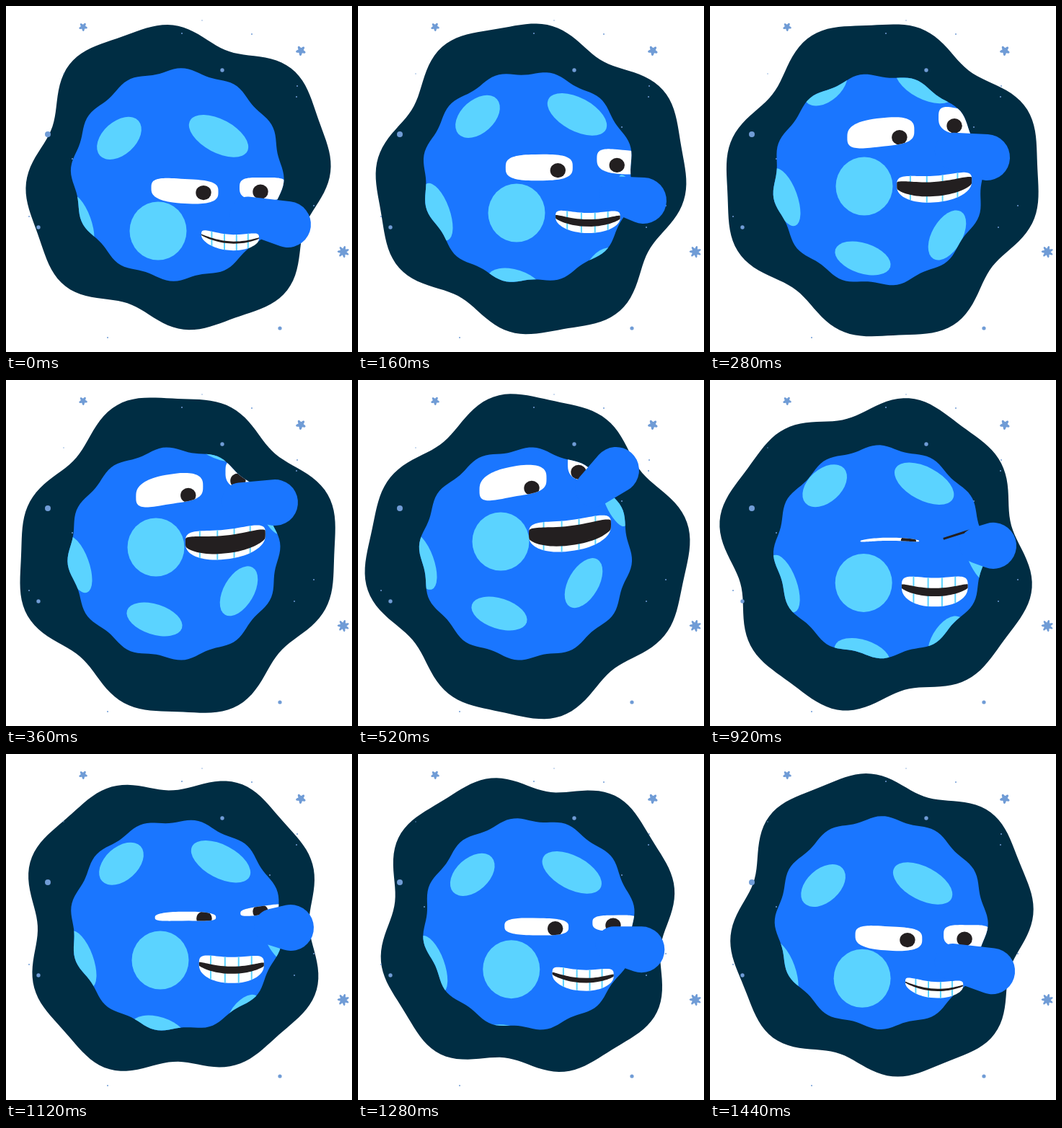
An HTML page with a canvas that plays this animation: 480x480 px, repeating every 1480 ms.

```html
<!DOCTYPE html>
<html lang="en">
<head>
<meta charset="utf-8">
<title>Laughing planet</title>
<style>
html, body { margin: 0; width: 100%; height: 100%; overflow: hidden; background: #fff; }
canvas { display: block; width: 100vw; height: 100vh; }
</style>
</head>
<body>
<canvas id="stage" width="480" height="480"></canvas>
<script>
const ctx = document.getElementById('stage').getContext('2d');
const LOOP = 1480, STEP = 40, TAU = Math.PI * 2, RAD = Math.PI / 180;
const SPACE = '#002d43', BODY = '#1a76ff', SPOT = '#5bd3ff', INK = '#231f20', STAR = '#709cd6';

// Time, cheek x and y, eye openness, nose root x and y, nose tip x and y.
const POSES = [
  [0, 211, 312, 1, 336, 290, 391, 303],
  [160, 220, 287, 1, 360, 262, 396, 270],
  [360, 208, 232, 1, 325, 168, 373, 170],
  [520, 198, 224, 1, 327, 151, 358, 125],
  [720, 211, 276, 0, 373, 217, 388, 217],
  [1120, 214, 286, .35, 370, 240, 395, 241]
];

// Offset from the cheek, how strongly the spot follows it vertically, radii, tilt.
const SPOTS = [
  { dx: 0, dy: 0, follow: 1, rx: 39.5, ry: 40.5, tilt: 0 },
  { dx: -54, dy: -140, follow: 1.2, rx: 36, ry: 23, tilt: -42 },
  { dx: 84, dy: -143, follow: 1.2, rx: 45, ry: 23, tilt: 28 },
  { dx: -110, dy: 13, follow: .55, rx: 42, ry: 17, tilt: 70 },
  { dx: -2, dy: 100, follow: 1, rx: 40, ry: 21, tilt: 18 },
  { dx: 115, dy: 70, follow: 1.4, rx: 38, ry: 21, tilt: -60 },
  { dx: 158, dy: -37, follow: 1.35, rx: 30, ry: 10, tilt: 62 }
];

const DOTS = [
  [58, 178, 4], [45, 307, 2.7], [300, 89, 2.7], [380, 447, 2.6], [244, 38, 1], [272, 20, .7],
  [341, 39, 1], [80, 94, .7], [404, 111, 1], [403, 126, 1], [366, 168, 1], [92, 212, 1],
  [32, 292, 1], [427, 277, 1], [400, 307, 1], [141, 460, 1]
];

// Pose values with the loop unrolled, so neighbours exist on both sides.
function key(i, j) {
  const n = POSES.length, lap = Math.floor(i / n);
  return POSES[i - lap * n][j] + (j ? 0 : lap * LOOP);
}

// Smooth interpolation without overshoot.
function poseAt(t) {
  let k = POSES.length - 1;
  while (key(k, 0) > t) k--;
  const slope = (i, j) => (key(i + 1, j) - key(i, j)) / (key(i + 1, 0) - key(i, 0));
  const tangent = (i, j) => {
    const a = slope(i - 1, j), b = slope(i, j);
    return a * b <= 0 ? 0 : 2 * a * b / (a + b);
  };
  const span = key(k + 1, 0) - key(k, 0), u = (t - key(k, 0)) / span, s = u * u * (3 - 2 * u);
  const [, x, y, open, rootX, rootY, tipX, tipY] = POSES[k].map((a, j) =>
    a + (key(k + 1, j) - a) * s
    + span * u * (1 - u) * ((1 - u) * tangent(k, j) - u * tangent(k + 1, j)));
  const lift = (312 - y) / 88;
  return { x, y, open, lift, rootX, rootY, tipX, tipY };
}

function fill(path, color) {
  ctx.fillStyle = color;
  ctx.fill(path);
}

function ellipse(x, y, rx, ry, tilt, color) {
  const path = new Path2D();
  path.ellipse(x, y, rx, ry, tilt * RAD, 0, TAU);
  fill(path, color);
}

function clipped(path, draw) {
  ctx.save();
  ctx.clip(path);
  draw();
  ctx.restore();
}

function radialPath(cx, cy, radius) {
  const path = new Path2D();
  for (let a = 0; a < TAU; a += TAU / 180) {
    path.lineTo(cx + radius(a) * Math.cos(a), cy + radius(a) * Math.sin(a));
  }
  path.closePath();
  return path;
}

// Rounded box that can slope and bow upwards by arch.
function lozenge({ cx, cy, w, h, slope, arch }) {
  const path = new Path2D(), soft = v => Math.sign(v) * Math.abs(v) ** .65;
  for (let a = 0; a < TAU; a += TAU / 90) {
    const x = soft(Math.cos(a)), y = soft(Math.sin(a));
    path.lineTo(cx + x * w / 2, cy + y * h / 2 + slope * x * w / 2 - arch * (1 - x * x));
  }
  path.closePath();
  return path;
}

function drawSpace(t, turn) {
  const wave = delay => Math.cos(TAU * (t - delay) / LOOP);
  fill(radialPath(235 + 5 * wave(150), 241 + 4 * wave(600), a => {
    const p = a - turn - 18 * RAD;
    return 210 + 5 * wave(560) - 11.5 * Math.cos(4 * p) - 7 * Math.cos(8 * p - .58);
  }), SPACE);
}

function drawStar(x, y, r, points, turn) {
  fill(radialPath(x, y, a => r * (.78 + .22 * Math.cos(points * (a - turn)))), STAR);
}

function drawStars() {
  DOTS.forEach(([x, y, r]) => ellipse(x, y, r, r, 0, STAR));
  drawStar(107, 29, 6, 5, -1);
  drawStar(409, 62, 7, 5, -2.1);
  drawStar(468, 341, 8.3, 7, -.4);
}

function drawEye(eye, pupilX, pupilY) {
  const { cx, cy, w, h, slope, arch } = eye;
  if (h < 4) {
    const rise = slope * w / 2;
    ctx.beginPath();
    ctx.moveTo(cx - w / 2, cy - rise);
    ctx.quadraticCurveTo(cx, cy - 2 * arch, cx + w / 2, cy + rise);
    ctx.strokeStyle = INK;
    ctx.lineWidth = 3;
    ctx.stroke();
    return;
  }
  const path = lozenge(eye);
  fill(path, '#fff');
  clipped(path, () => ellipse(cx + pupilX, cy + pupilY * h, 10.7, 10.2, 0, INK));
}

function drawEyes({ x, y, lift, open }) {
  const shut = 1 - open, raised = lift * open;
  drawEye({
    cx: x + 37 - 20 * raised, cy: y - 57 - 22 * raised,
    w: 93 - 13 * shut, h: (34 + 8 * lift) * open,
    slope: .06 * open - .24 * raised, arch: 6 * lift - 2 + 3 * shut
  }, 26, .12);
  drawEye({
    cx: x + 146 - 34 * lift * lift, cy: y - 60 - 43 * lift + 5 * shut,
    w: 66 - 28 * lift * lift, h: (32 + 6 * lift) * open,
    slope: .3 * raised - .4 * shut * shut, arch: 2 * lift - 2 * open
  }, -4, .18);
}

// Two circles joined by their outer tangents.
function drawNose({ rootX, rootY, tipX, tipY }) {
  const rootR = 25.5, tipR = 32;
  const angle = Math.atan2(tipY - rootY, tipX - rootX);
  const off = Math.acos((rootR - tipR) / Math.hypot(tipX - rootX, tipY - rootY));
  const path = new Path2D();
  path.arc(rootX, rootY, rootR, angle + off, angle - off + TAU);
  path.arc(tipX, tipY, tipR, angle - off, angle + off);
  fill(path, BODY);
}

function drawMouth({ x, y, lift, open }) {
  const mouth = {
    cx: x + 100 - 4 * lift, cy: y + 7 - 24 * lift * lift,
    w: 80 + 34 * lift, h: 22 + 21 * lift + 12 * (1 - open),
    slope: .06 - .18 * lift, arch: -9
  };
  const path = lozenge(mouth);
  fill(path, '#fff');
  clipped(path, () => {
    ctx.fillStyle = SPOT;
    for (const f of [-.32, -.1, .11, .31]) {
      ctx.fillRect(mouth.cx + f * mouth.w - 1, mouth.cy - 50, 2, 100);
    }
    fill(lozenge({ ...mouth, w: mouth.w + 3, h: 3 + 24 * lift }), INK);
  });
}

function draw(t) {
  const pose = poseAt(t), turn = t / LOOP * TAU / 4;
  ctx.fillStyle = '#fff';
  ctx.fillRect(0, 0, 480, 480);
  drawSpace(t, turn);
  drawStars();
  const headX = 234 + .06 * (pose.y - 250), headY = 241 - .14 * Math.max(0, pose.y - 262);
  const head = radialPath(headX, headY, a => 145 + 3 * Math.cos(12 * (a - turn - 3 * RAD)));
  fill(head, BODY);
  clipped(head, () => {
    for (const { dx, dy, follow, rx, ry, tilt } of SPOTS) {
      ellipse(pose.x + dx, 255 + dy + follow * (pose.y - 255), rx, ry, tilt, SPOT);
    }
    drawEyes(pose);
  });
  drawNose(pose);
  drawMouth(pose);
}

const start = performance.now();
function tick() {
  const t = (performance.now() - start) % LOOP;
  draw(Math.floor(t / STEP) * STEP);
  requestAnimationFrame(tick);
}
tick();
</script>
</body>
</html>
```
